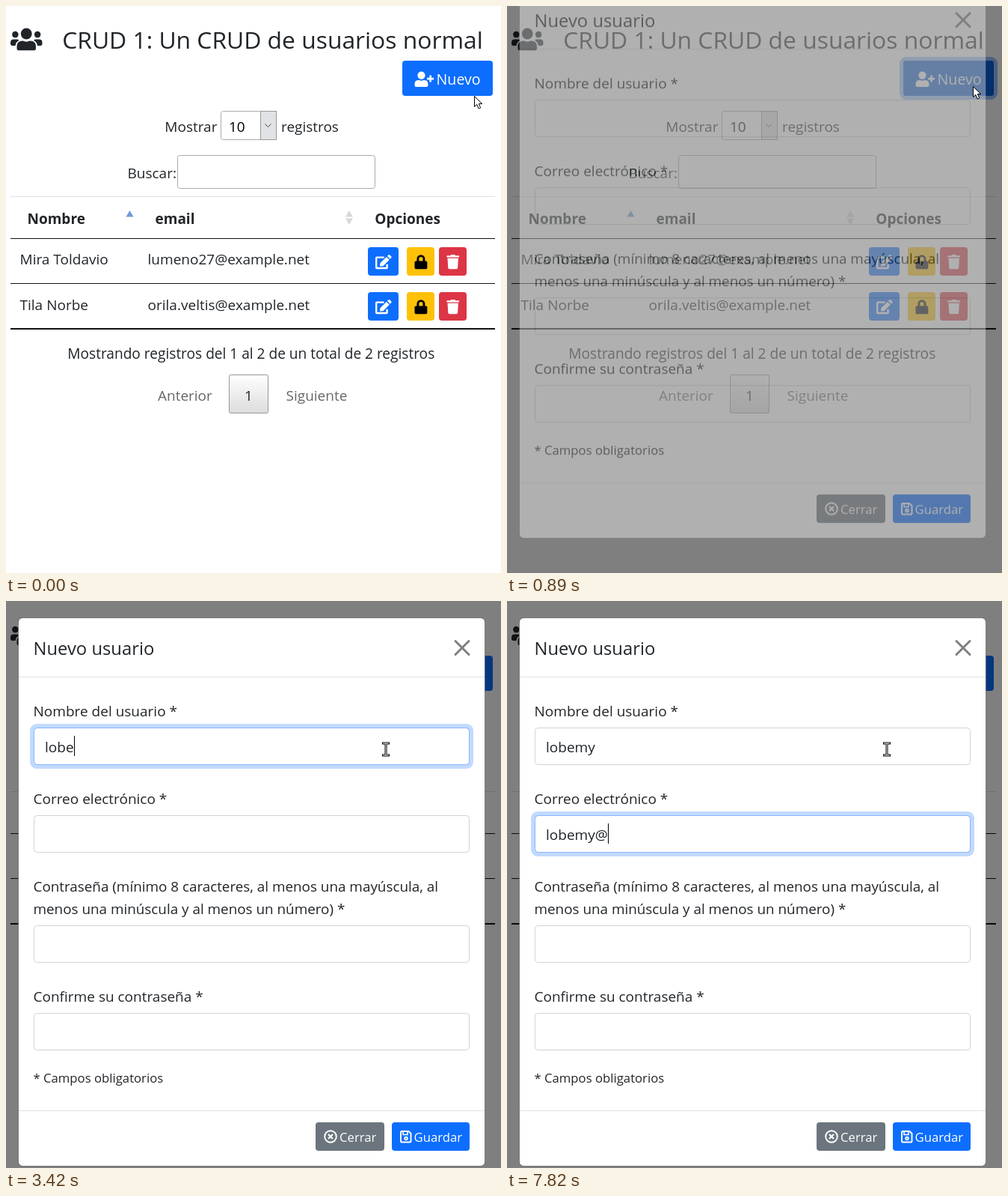
These frames come from a looping animation (662 by 757 pixels, 8 s). An HTML page:

```html
<!DOCTYPE html>
<html lang="es">
<head>
<meta charset="utf-8">
<title>CRUD</title>
<style>
  html, body { margin: 0; width: 100%; height: 100%; overflow: hidden; background: #fff; }
  svg { display: block; }
  text { font: 19px "Open Sans", "Noto Sans", sans-serif; fill: #212529; white-space: pre; }
  .bold { font-weight: 700; }
  .muted { fill: #666; }
  .small { font-size: 16.7px; }
  .light { fill: #fff; }
  .line { stroke: #111; }
  .thin { stroke: #dee2e6; }
  .box { fill: #fff; stroke: #aaa; }
  .input { fill: #fff; stroke: #ced4da; }
  .ring { fill: none; stroke: #0d6efd; stroke-opacity: .25; }
</style>
</head>
<body>
<svg width="662" height="757" viewBox="0 0 662 757">
  <defs>
    <linearGradient id="pageFill" x2="0" y2="1">
      <stop stop-color="#fff"/><stop offset="1" stop-color="#dcdcdc"/>
    </linearGradient>
    <path id="side" d="M64 256h64q25 0 45 18Q107 312 98 384H32q-32 0-32-32v-32q0-64 64-64z M32 160a64 64 0 0 1 128 0a64 64 0 0 1-128 0z"/>
    <g id="users">
      <use href="#side"/><use href="#side" transform="matrix(-1 0 0 1 640 0)"/>
      <circle cx="320" cy="144" r="112"/>
      <path d="M128 432v-29q0-115 115-115h8q69 32 138 0h8q115 0 115 115v29q0 48-48 48H176q-48 0-48-48z"/>
    </g>
    <g id="userPlus">
      <circle cx="224" cy="128" r="128"/>
      <path d="M0 464v-42q0-134 134-134h17q73 32 146 0h17q134 0 134 134v42q0 48-48 48H48q-48 0-48-48z"/>
      <path d="M416 240h224M528 128v224" stroke="#fff" stroke-width="64"/>
    </g>
    <g id="edit">
      <path d="M310 96H48q-16 0-16 16V464q0 16 16 16H400q16 0 16-16V340" fill="none" stroke="#fff" stroke-width="64"/>
      <path d="M396 77 500 180 274 406 160 416 170 302zM425 47 460 12q28-24 56 0l48 48q24 28 0 56l-35 35z"/>
    </g>
    <g id="lock">
      <rect y="224" width="448" height="288" rx="48"/>
      <path d="M116 240v-88a108 108 0 0 1 216 0v88" fill="none" stroke="#000" stroke-width="78"/>
    </g>
    <g id="trash">
      <rect y="32" width="448" height="64" rx="20"/>
      <path d="M128 40l16-30q6-10 18-10h124q12 0 18 10l16 30zM32 128H416L395 467q-3 45-48 45H101q-45 0-48-45z"/>
    </g>
    <g id="options">
      <rect x="484" y="322" width="41" height="38" rx="4" fill="#0d6efd"/>
      <rect x="536" y="322" width="37" height="38" rx="4" fill="#ffc107"/>
      <rect x="579" y="322" width="37" height="38" rx="4" fill="#dc3545"/>
      <use href="#edit" transform="translate(494 332) scale(.0375)" fill="#fff"/>
      <use href="#lock" transform="translate(546.5 332) scale(.0375)"/>
      <use href="#trash" transform="translate(589.3 332) scale(.0375)" fill="#fff"/>
    </g>
  </defs>

  <rect width="662" height="757" fill="#fff"/>
  <use href="#users" transform="translate(6 27.5) scale(.0664)" fill="#212529"/>
  <text x="75.2" y="57" style="font-size:31.8px">CRUD 1: Un CRUD de usuarios normal</text>

  <rect id="newRing" x="530" y="73" width="121" height="47" rx="4" fill="none" stroke="#3184fd" stroke-opacity=".5"/>
  <rect x="530" y="73" width="121" height="47" rx="4" fill="#0d6efd"/>
  <rect id="newDark" x="530" y="73" width="121" height="47" rx="4" fill="#0b5ed7"/>
  <use href="#userPlus" transform="translate(546.5 87.5) scale(.04)" fill="#fff"/>
  <text class="light" x="575.6" y="105" style="font-size:19.6px">Nuevo</text>

  <text x="212.3" y="168">Mostrar</text>
  <rect class="box" x="287.5" y="140.5" width="74" height="38" rx="3"/>
  <rect x="340.5" y="140.5" width="21" height="38" fill="#e1e2e5" stroke="#999"/>
  <path d="M346.5 157.5l4 4 4-4" fill="none" stroke="#444"/>
  <text x="298" y="168" style="fill:#000">10</text>
  <text x="368" y="168">registros</text>
  <text x="162.5" y="230">Buscar:</text>
  <rect class="box" x="229.5" y="199.5" width="264" height="44" rx="3"/>

  <path class="thin" d="M6 254.5H654"/>
  <text class="bold" x="28.5" y="291">Nombre</text>
  <text class="bold" x="199.5" y="291">email</text>
  <text class="bold" x="493.3" y="291">Opciones</text>
  <path d="M160.5 281.5l5-8.5 5 8.5z" fill="#6c9ad8"/>
  <path d="M454 281.5l5-8.5 5 8.5zM454 283.5l5 8.5 5-8.5z" fill="#d9d9d9"/>
  <path class="line" d="M6 310.5H654M6 370.5H654"/>
  <path class="line" d="M6 431H654" stroke-width="2"/>
  <text x="18.5" y="345">Mira Toldavio</text>
  <text x="189.5" y="345">lumeno27@example.net</text>
  <text x="18.5" y="406">Tila Norbe</text>
  <text x="189.5" y="406">orila.veltis@example.net</text>
  <use href="#options"/><use href="#options" y="60"/>
  <text x="82.3" y="471" style="font-size:19.1px">Mostrando registros del 1 al 2 de un total de 2 registros</text>
  <text class="muted" x="203" y="527">Anterior</text>
  <rect x="298.5" y="492.5" width="52" height="51" rx="2" fill="url(#pageFill)" stroke="#979797"/>
  <text x="319" y="527">1</text>
  <text class="muted" x="374.5" y="527">Siguiente</text>

  <rect id="backdrop" width="662" height="757"/>

  <g id="modal">
    <rect x="16.5" y="22.5" width="624" height="732" rx="6" fill="#fff" stroke="#000" stroke-opacity=".35"/>
    <text x="36.5" y="72" style="font-size:23.8px">Nuevo usuario</text>
    <path d="M601 53.5l18 18M619 53.5l-18 18" stroke="#7f7f7f" stroke-width="3" stroke-linecap="round"/>
    <path class="thin" d="M17 101.5H640M17 680.5H640"/>
    <g id="labels">
      <text x="36.5" y="154">Nombre del usuario *</text>
      <text x="36.5" y="271">Correo electrónico *</text>
      <text x="36.5" y="388" style="font-size:18.85px">Contraseña (mínimo 8 caracteres, al menos una mayúscula, al</text>
      <text x="36.5" y="418" style="font-size:18.85px">menos una minúscula y al menos un número) *</text>
      <text x="36.5" y="535">Confirme su contraseña *</text>
    </g>
    <g id="fields"></g>
    <text class="small" x="36.5" y="643">* Campos obligatorios</text>
    <rect x="414" y="696" width="92" height="38" rx="4" fill="#6c757d"/>
    <rect x="516" y="696" width="104" height="38" rx="4" fill="#0d6efd"/>
    <g fill="none" stroke="#fff" stroke-width="1.9">
      <circle cx="434" cy="715" r="7.8"/>
      <path d="M431 712l6 6M437 712l-6 6" stroke-width="2.2"/>
      <path d="M529 708h9.5l3 3v10.5q0 1-1 1h-11.5q-1 0-1-1v-12.5q0-1 1-1z"/>
      <path d="M531 708v4.5h6v-4.5" stroke-width="1.6"/>
      <circle cx="535" cy="717.5" r="1.8"/>
    </g>
    <text class="light small" x="446" y="722">Cerrar</text>
    <text class="light small" x="545.5" y="722">Guardar</text>
  </g>

  <path id="arrow" d="M.5 .5v14l3.3-3 2.3 5.5 2.6-1.1-2.4-5.3h4.4z" fill="#fff" stroke="#000"/>
  <g id="beam" fill="none">
    <path d="M-5 -8H5M-5 8H5M0 -8V8" stroke="#000" stroke-width="3"/>
    <path d="M-4 -8H4M-4 8H4M0 -8V8" stroke="#fff"/>
  </g>
</svg>

<script>
const LOOP = 8000;
const $ = id => document.getElementById(id);
const clamp = v => Math.min(1, Math.max(0, v));
const ramp = (t, start, length) => clamp((t - start) / length);
const show = (el, opacity) => el.setAttribute('opacity', opacity);
const move = (el, x, y) => el.setAttribute('transform', `translate(${x} ${y})`);

// The ring lies behind its box, so only the outer half of the stroke shows.
function spread(ring, amount) {
  ring.setAttribute('stroke-width', 10 * amount);
  show(ring, amount);
}

// Last entry [time, ...values] that has begun.
const current = (track, t) => track.findLast(([start]) => start <= t).slice(1);

$('fields').innerHTML = [169, 286, 433, 550].map(y => `
  <g>
    <rect class="ring" x="37" y="${y}" width="583" height="50" rx="4" opacity="0"/>
    <rect class="input" x="37.5" y="${y + .5}" width="582" height="49" rx="4"/>
    <rect class="edge" x="37.5" y="${y + .5}" width="582" height="49" rx="4" fill="none" stroke="#86b7fe" opacity="0"/>
    <text x="52" y="${y + 33}"></text>
    <rect class="caret" y="${y + 11}" width="1" height="27" opacity="0"/>
  </g>`).join('');
const [nameField, mailField] = $('fields').children;

const user = 'lobemy@';
// [time, typed letters, caret visible]
const nameTrack = [
  [0, 0, 0], [2100, 0, 1], [2650, 0, 0], [2980, 0, 1], [3200, 1, 1], [3310, 3, 1], [3420, 4, 1],
  [3750, 4, 0], [4300, 4, 1], [4410, 5, 1], [4520, 6, 1], [4850, 6, 0]
];
const mailTrack = [
  [0, 0, 0], [4850, 0, 1], [5400, 2, 1], [5510, 3, 1], [5730, 4, 1], [5950, 4, 0],
  [6280, 6, 1], [6500, 6, 0], [6940, 6, 1], [7490, 6, 0], [7820, 7, 1]
];
const pointerTrack = [
  [0, 626, 120], [330, 625, 114], [440, 623, 107], [1550, 575, 146],
  [1660, 522, 181], [1770, 513, 191], [1880, 508, 198]
];

// CSS ease-out: cubic-bezier(0, 0, .58, 1), solved by bisection.
function easeOut(x) {
  let low = 0, high = 1;
  for (let i = 0; i < 20; i++) {
    const s = (low + high) / 2;
    if (1.74 * s * s * (1 - s) + s ** 3 < x) low = s; else high = s;
  }
  return 3 * low ** 2 - 2 * low ** 3;
}

function drawField(field, track, t, focus) {
  const [letters, caretOn] = current(track, t);
  const text = field.querySelector('text');
  const caret = field.querySelector('.caret');
  text.textContent = user.slice(0, letters);
  caret.setAttribute('x', Math.round(52 + (letters ? text.getComputedTextLength() : 0)));
  show(caret, caretOn);
  show(field.querySelector('.edge'), focus);
  spread(field.querySelector('.ring'), focus);
}

function draw(t) {
  // The screen refreshes every 110 ms.
  const tick = 10 + Math.floor((t - 10) / 110) * 110;

  const blur = ramp(tick, 1132, 150);
  spread($('newRing'), ramp(tick, 663, 150) * (1 - blur));
  show($('newDark'), t < 440 ? 0 : 1 - blur);

  show($('backdrop'), .5 * ramp(tick, 663, 150));
  show($('modal'), ramp(tick, 832, 150));
  move($('modal'), 0, -62.5 * (1 - easeOut(ramp(tick, 832, 300))));

  const leaving = ramp(tick, 4800, 150);
  drawField(nameField, nameTrack, t, ramp(tick, 2050, 150) * (1 - leaving));
  drawField(mailField, mailTrack, t, leaving);

  const [x, y] = current(pointerTrack, t);
  const overInput = t >= 1660;
  move($('arrow'), x, y);
  move($('beam'), x, y);
  show($('arrow'), overInput ? 0 : 1);
  show($('beam'), overInput ? 1 : 0);
}

function loop() {
  draw(performance.now() % LOOP);
  requestAnimationFrame(loop);
}
loop();
</script>
</body>
</html>
```
